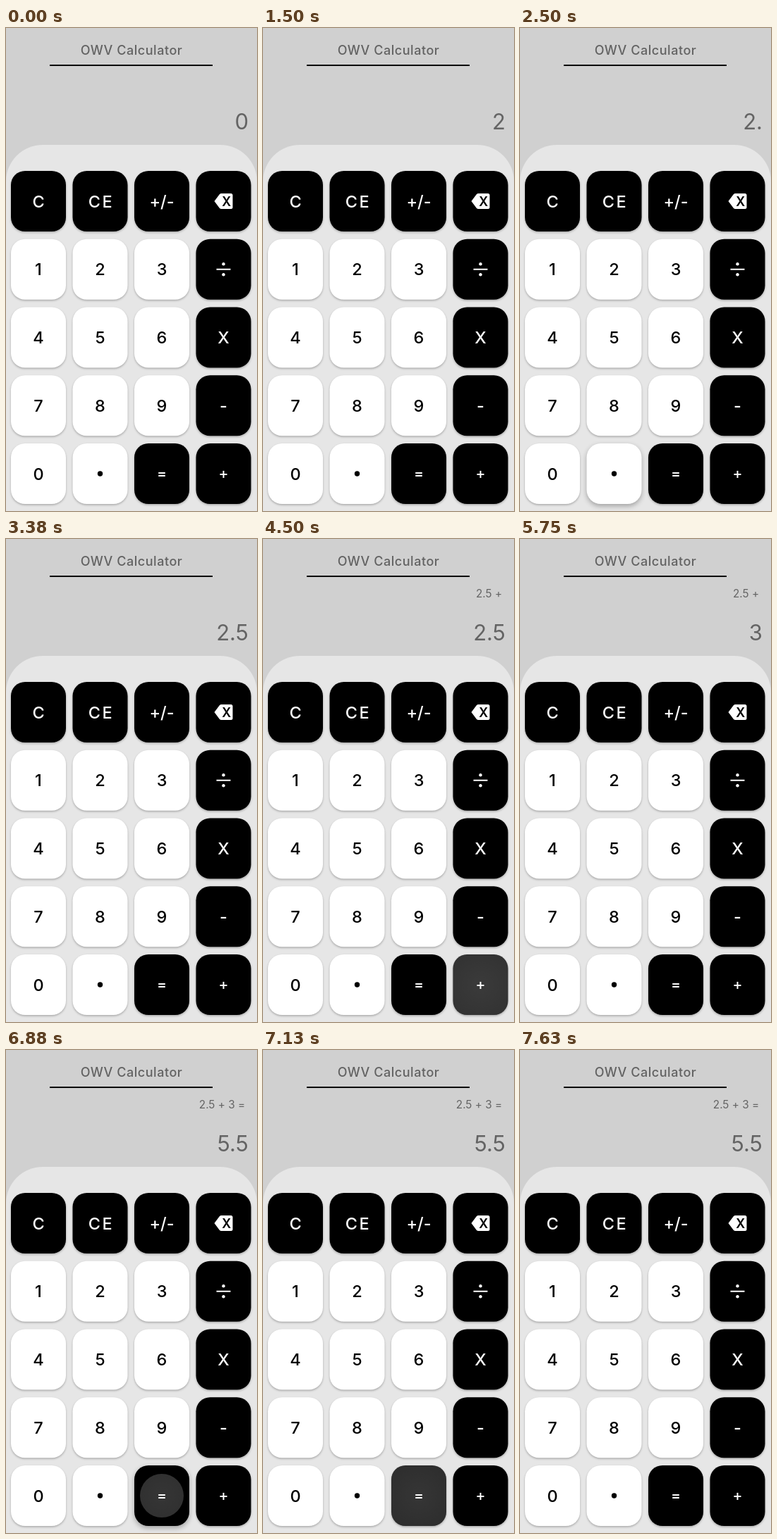
Recreate the animation shown at these times as an HTML page with a canvas. Size 356 by 686 pixels, loop 8 s.

```html
<!DOCTYPE html>
<html lang="en">
<head>
<meta charset="utf-8">
<title>Calculator</title>
<style>
  html, body { margin: 0; width: 100%; height: 100%; overflow: hidden; background: #d0d0d0; }
  canvas { display: block; width: 356px; height: 686px; }
</style>
</head>
<body>
<canvas></canvas>
<script>
const W = 356, H = 686, LOOP = 8000, STEP = 125;
const FONT = 'Inter, "Open Sans", sans-serif';
const canvas = document.querySelector('canvas');
const ctx = canvas.getContext('2d');
const scale = window.devicePixelRatio || 1;
canvas.width = W * scale;
canvas.height = H * scale;

const KEYS = ['C', 'CE', '+/-', 'del', '1', '2', '3', '÷', '4', '5', '6', 'X',
  '7', '8', '9', '-', '0', '•', '=', '+'];
const DARK = new Set(['C', 'CE', '+/-', 'del', '÷', 'X', '-', '=', '+']);
const KEY_W = 78, KEY_H = 86, RADIUS = 20;

// Raised from `down` to `up`; the ripple fades between `fade` and `end`.
const PRESSES = [
  { key: '•', down: 2375, up: 2625 },
  { key: '5', down: 3250, up: 3375 },
  { key: '+', down: 4250, up: 4500, fade: 4875, end: 5125, tone: 0.225 },
  { key: '3', down: 5625, up: 5750 },
  { key: '=', down: 6750, up: 7125, fade: 7375, end: 7625, tone: 0.205 }
];
const DISPLAY = [[0, '0'], [1500, '2'], [2500, '2.'], [3250, '2.5'], [5625, '3'], [6875, '5.5']];
const HISTORY = [[0, ''], [4375, '2.5 +'], [6875, '2.5 + 3 =']];

const valueAt = (track, t) => track.filter(([start]) => start <= t).pop()[1];

function text(str, x, y, size, { weight = 400, color = '#646464', align = 'center', spacing = 0 } = {}) {
  ctx.font = `${weight} ${size}px ${FONT}`;
  ctx.letterSpacing = spacing + 'px';
  ctx.textAlign = align;
  ctx.fillStyle = color;
  ctx.fillText(str, x, y);
}

function box(x, y, w, h, r) {
  ctx.beginPath();
  ctx.roundRect(x, y, w, h, r);
}

function dot(x, y, r) {
  ctx.beginPath();
  ctx.arc(x, y, r, 0, Math.PI * 2);
  ctx.fill();
}

function drawDelete(x, y) {
  ctx.fillStyle = '#fff';
  ctx.beginPath();
  ctx.moveTo(x - 13, y);
  ctx.lineTo(x - 5.5, y - 10);
  ctx.quadraticCurveTo(x - 4.6, y - 11, x - 3, y - 11);
  ctx.arcTo(x + 13, y - 11, x + 13, y, 2.5);
  ctx.arcTo(x + 13, y + 11, x, y + 11, 2.5);
  ctx.lineTo(x - 3, y + 11);
  ctx.quadraticCurveTo(x - 4.6, y + 11, x - 5.5, y + 10);
  ctx.closePath();
  ctx.fill();
  text('X', x + 4.3, y + 6.6, 18, { weight: 600, color: '#000' });
}

function drawLabel(key, x, y, color) {
  const style = { weight: 500, color };
  ctx.fillStyle = color;
  if (key === 'del') drawDelete(x, y);
  else if (key === '•') dot(x, y, 3.7);
  else if (key === '÷') {
    ctx.fillRect(x - 10, y - 1, 20, 2);
    dot(x, y - 7.5, 2.2);
    dot(x, y + 7.5, 2.2);
  } else if (key === 'CE') text(key, x + 1.5, y + 8.7, 23.5, { ...style, spacing: 2.5 });
  else if (key === '=' || key === '+') text(key, x, y + 7.4, 21, style);
  else text(key, x, y + 8.7, 23.5, style);
}

function drawRipple(x, y, grow, alpha) {
  const cx = x + KEY_W / 2, cy = y + KEY_H / 2;
  const shade = ctx.createRadialGradient(cx, cy, 10, cx, cy, 62);
  shade.addColorStop(0, `rgba(255,255,255,${alpha})`);
  shade.addColorStop(1, `rgba(255,255,255,${alpha * 0.85})`);
  ctx.save();
  box(x, y, KEY_W, KEY_H, RADIUS);
  ctx.clip();
  ctx.fillStyle = shade;
  dot(cx, cy, 62 * grow);
  ctx.restore();
}

function drawKey(key, i, t) {
  const x = 7 + (i % 4) * 87.5;
  const y = 203 + Math.floor(i / 4) * 96.75;
  const dark = DARK.has(key);
  const press = PRESSES.find(p => p.key === key && t >= p.down && t < (p.end || p.up));
  const raised = press && t < press.up;

  ctx.save();
  ctx.shadowColor = raised ? 'rgba(0,0,0,.3)' : 'rgba(0,0,0,.27)';
  ctx.shadowBlur = (raised ? 7 : 3) * scale;
  ctx.shadowOffsetY = (raised ? 3 : 1.5) * scale;
  ctx.fillStyle = dark ? '#000' : '#fff';
  box(x, y, KEY_W, KEY_H, RADIUS);
  ctx.fill();
  ctx.restore();

  if (press && press.tone) {
    const grow = Math.min(1, (t - press.down + STEP) / (press.up - press.down + STEP));
    const fade = t < press.fade ? 1 : (press.end - t) / (press.end - press.fade + STEP);
    drawRipple(x, y, grow, press.tone * fade);
  }
  drawLabel(key, x + KEY_W / 2, y + KEY_H / 2, dark ? '#fff' : '#000');
}

function draw(t) {
  ctx.setTransform(scale, 0, 0, scale, 0, 0);
  ctx.fillStyle = '#d0d0d0';
  ctx.fillRect(0, 0, W, H);

  text('OWV Calculator', 178, 37.5, 18, { weight: 500, color: '#626262', spacing: 0.55 });
  ctx.fillStyle = '#000';
  ctx.fillRect(62, 52, 231, 2);
  text(valueAt(HISTORY, t), 339, 83, 15.3, { align: 'right' });
  text(valueAt(DISPLAY, t), 344, 143.5, 31, { align: 'right' });

  ctx.fillStyle = '#e6e6e6';
  box(0, 166, W, H - 166, [52, 52, 0, 0]);
  ctx.fill();
  KEYS.forEach((key, i) => drawKey(key, i, t));
}

const start = performance.now();
function frame() {
  const t = (performance.now() - start) % LOOP;
  draw(Math.floor(t / STEP) * STEP);
  requestAnimationFrame(frame);
}
frame();
</script>
</body>
</html>
```
